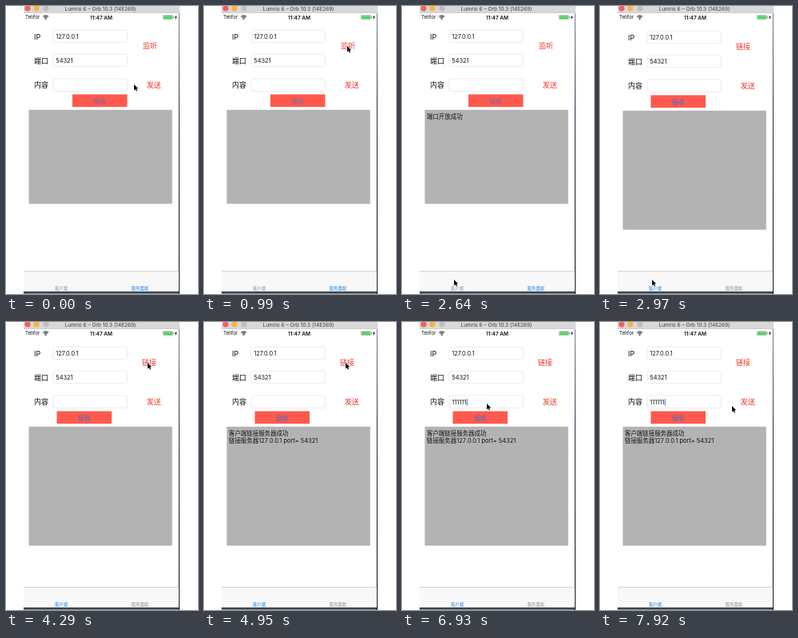
Recreate the animation shown at these times as an HTML page with a canvas. Size 240 by 360 pixels, loop 8 s.

```html
<!DOCTYPE html>
<html lang="zh">
<head>
<meta charset="utf-8">
<title>Socket demo</title>
<style>
html, body { margin: 0; width: 100%; height: 100%; overflow: hidden; background: #fff; }
canvas { display: block; width: 240px; height: 360px; }
</style>
</head>
<body>
<canvas id="stage"></canvas>
<script>
const W = 240, H = 360, LOOP = 8000, STEP = 330;
const FONT = 'Inter, "Noto Sans CJK SC", "Noto Sans CJK", sans-serif';
const RED = '#e8392b', BLUE = '#1b86e6', GREY = '#929292';

const canvas = document.getElementById('stage');
const ctx = canvas.getContext('2d');
const ratio = window.devicePixelRatio || 1;
canvas.width = W * ratio;
canvas.height = H * ratio;
ctx.scale(ratio, ratio);

// Pointer positions: [first step, x, y], each held until the next.
const pointerPath = [
  [0, 160, 98], [2, 177, 50], [3, 179, 50],
  [6, 82, 314], [7, 69, 337], [8, 65, 342],
  [11, 170, 58], [12, 177, 51],
  [16, 112, 106], [17, 106, 102],
  [22, 136, 104], [23, 165, 105]
];

function rect(x, y, w, h, color) {
  ctx.fillStyle = color;
  ctx.fillRect(x, y, w, h);
}

function dot(x, y, r, color) {
  ctx.fillStyle = color;
  ctx.beginPath();
  ctx.arc(x, y, r, 0, Math.PI * 2);
  ctx.fill();
}

// y is the vertical middle of the glyphs.
function text(str, x, y, size, color = '#111', align = 'left', weight = 400) {
  ctx.font = `${weight} ${size}px ${FONT}`;
  ctx.fillStyle = color;
  ctx.textAlign = align;
  ctx.textBaseline = 'alphabetic';
  ctx.fillText(str, x, y + size * 0.37);
  return ctx.measureText(str).width;
}

function drawWindow() {
  rect(0, 0, W, H, '#fff');
  rect(22, 356.6, 195, 3.4, '#25313b');
  rect(22, 358.6, 195, 1.4, '#7d8a91');
  const edge = ctx.createLinearGradient(0, 0, 0, H);
  edge.addColorStop(0, '#8b98a5');
  edge.addColorStop(0.35, '#3a4a5c');
  edge.addColorStop(0.7, '#30303c');
  edge.addColorStop(1, '#17222b');
  rect(215.8, 9, 1.2, 351, edge);

  rect(22, 0, 195, 9, '#d8d8d8');
  rect(22, 8.5, 195, 0.5, '#c2c2c2');
  dot(27, 3, 3.6, '#f4605a');
  dot(38, 3, 3.6, '#f6b53c');
  dot(50, 3, 3.6, '#bfbfbf');
  text('Lumrio 6 – Orb 10.3 (14E269)', 118, 3.2, 6.5, '#3c3c3c', 'center');
}

function drawStatus() {
  text('Telifor', 24, 14.2, 6.2);
  ctx.strokeStyle = '#111';
  ctx.lineWidth = 0.9;
  for (const r of [1.8, 3.3, 4.8]) {
    ctx.beginPath();
    ctx.arc(49.7, 16.6, r, -Math.PI * 0.76, -Math.PI * 0.24);
    ctx.stroke();
  }
  dot(49.7, 16.2, 0.7, '#111');
  text('11:47 AM', 119, 14.2, 6.5, '#111', 'center', 600);

  ctx.strokeStyle = '#777';
  ctx.lineWidth = 0.5;
  ctx.beginPath();
  ctx.roundRect(196.2, 11.6, 12.4, 5, 1);
  ctx.stroke();
  rect(197, 12.2, 10.8, 3.8, '#4cd964');
  rect(209, 13.2, 0.8, 1.8, '#777');
  ctx.fillStyle = '#111';
  ctx.beginPath();
  for (const [x, y] of [[212.9, 11.4], [210.8, 14.6], [212, 14.6], [211.6, 17], [213.8, 13.6], [212.5, 13.6]]) {
    ctx.lineTo(x, y);
  }
  ctx.fill();
}

function field(y, value) {
  ctx.strokeStyle = '#dedede';
  ctx.lineWidth = 0.6;
  ctx.beginPath();
  ctx.roundRect(59, y - 7.8, 92.5, 15.6, 2.5);
  ctx.stroke();
  return text(value, 62.3, y + 0.2, 7.4);
}

function drawForm(client, lines, typed, caret) {
  const dy = client ? 1 : 0;
  const rows = [['IP', 38, '127.0.0.1'], ['端口', 68, '54321'], ['内容', 98.7, typed]];
  let width = 0;
  for (const [label, y, value] of rows) {
    text(label, 35, y + dy + 0.2, 9);
    width = field(y + dy, value);
  }
  if (caret) rect(62.8 + width, 95 + dy, 0.9, 8.6, '#3f6be0');

  text(client ? '链接' : '监听', client ? 170 : 171, 50 + dy, 9, RED);
  text('发送', 175.7, 98.7 + dy, 9, RED);

  const bx = client ? 63.5 : 83;
  rect(bx, 110.5 + dy, 68.5, 15.7, '#ff594e');
  text('接收', bx + 34.2, 118.6 + dy, 8, client ? '#4a6cc8' : '#7565a8', 'center');

  rect(28.5, 129.8 + dy, 179.2, client ? 148.8 : 117.5, '#b3b3b3');
  lines.forEach((line, i) => text(line, 31, 138.6 + dy + i * 9, 7.45));
}

function drawTabs(client) {
  rect(22, 331, 193.8, 25.6, '#f8f8f8');
  rect(22, 331, 193.8, 0.6, '#bcbcbc');
  text('客户端', 69, 353.2, 5.3, client ? BLUE : GREY, 'center');
  text('服务器端', 167.3, 353.2, 5.3, client ? GREY : BLUE, 'center');
}

function drawPointer(step) {
  const [, x, y] = pointerPath.filter(p => p[0] <= step).pop();
  ctx.beginPath();
  for (const [px, py] of [[0, 0], [0, 7.4], [1.7, 5.9], [2.9, 8.6], [4.1, 8.1], [2.9, 5.4], [5.2, 5.3]]) {
    ctx.lineTo(x + px, y + py);
  }
  ctx.closePath();
  ctx.lineJoin = 'round';
  ctx.strokeStyle = '#fff';
  ctx.lineWidth = 1;
  ctx.stroke();
  ctx.fillStyle = '#000';
  ctx.fill();
}

function logLines(step) {
  if (step >= 14) return ['客户端链接服务器成功', '链接服务器127.0.0.1 port= 54321'];
  return step >= 4 && step < 9 ? ['端口开放成功'] : [];
}

function draw(time) {
  const step = Math.floor((time % LOOP) / STEP);
  const client = step >= 9;
  const typed = '1'.repeat(Math.max(0, Math.min(6, (step - 18) * 2)));
  drawWindow();
  drawStatus();
  drawForm(client, logLines(step), typed, step >= 18);
  drawTabs(client);
  drawPointer(step);
}

const start = performance.now();
function tick() {
  draw(performance.now() - start);
  requestAnimationFrame(tick);
}
tick();
</script>
</body>
</html>
```
